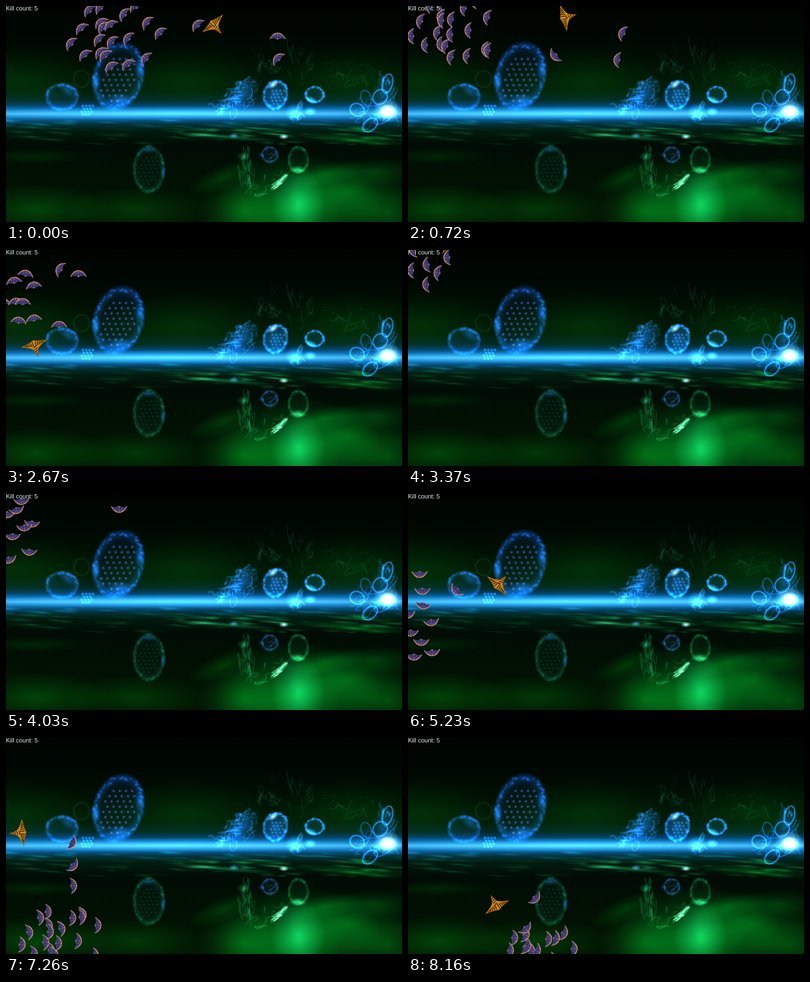
Animation of 707x385 px, one loop 8190 ms. Source, as an HTML page with a canvas:

```html
<!DOCTYPE html>
<html lang="en">
<head>
<meta charset="utf-8">
<title>Flock</title>
<style>
html, body { margin: 0; width: 100%; height: 100%; overflow: hidden; background: #000; }
canvas { display: block; }
</style>
</head>
<body>
<canvas id="stage" width="707" height="385"></canvas>
<script>
const W = 707, H = 385, LOOP = 8190, TAU = Math.PI * 2;
const ctx = document.getElementById('stage').getContext('2d');
const scene = document.createElement('canvas');
scene.width = W;
scene.height = H;
const g = scene.getContext('2d');

let seed = 7;
const rnd = () => (seed = (seed * 16807) % 2147483647) / 2147483647;
const spread = r => (rnd() * 2 - 1) * r;

// ---------- scenery ----------
const BLUE = '#1e78ff', DEEP = '#1450c8', SKY = '#46b4ff', ICE = '#beF0ff',
  GREEN = '#006e18', MOSS = '#003c08', TEAL = '#0a4638', MINT = '#1e9a5a';

function local(x, y, rot, alpha, draw) {
  g.save();
  g.translate(x, y);
  g.rotate(rot);
  g.globalAlpha = Math.min(1, alpha);
  draw();
  g.restore();
}

function glow(x, y, rx, ry, c, a, rot = 0) {
  local(x, y, rot, a, () => {
    g.scale(rx, ry);
    const f = g.createRadialGradient(0, 0, 0, 0, 0, 1);
    f.addColorStop(0, c);
    f.addColorStop(0.5, c + '73');
    f.addColorStop(1, c + '00');
    g.fillStyle = f;
    g.fillRect(-1, -1, 2, 2);
  });
}

function softStroke(c, a, w) {
  g.strokeStyle = c;
  for (const k of [3, 1]) {
    g.globalAlpha = a / k;
    g.lineWidth = w * k;
    g.stroke();
  }
}

function ring(x, y, rx, ry, c, a, rot = 0) {
  local(x, y, rot, 1, () => {
    g.beginPath();
    g.ellipse(0, 0, rx, ry, 0, 0, TAU);
    softStroke(c, a, 1.4);
  });
}

// hollow cell with a mottled rim
function cell(x, y, rx, ry, c, a, rot = 0) {
  local(x, y, rot, a, () => {
    g.save();
    g.scale(rx, ry);
    const f = g.createRadialGradient(0, 0, 0, 0, 0, 1.08);
    f.addColorStop(0, c + '14');
    f.addColorStop(0.65, c + '24');
    f.addColorStop(0.88, c + '8c');
    f.addColorStop(1, c + '00');
    g.fillStyle = f;
    g.fillRect(-1.1, -1.1, 2.2, 2.2);
    g.restore();
    const n = rx + ry;
    for (let i = 0; i < n; i++) {
      const p = i / n * TAU, k = 0.93 + spread(0.08), s = 1.5 + rnd() * 3;
      glow(Math.cos(p) * rx * k, Math.sin(p) * ry * k, s, s, c, a * rnd());
    }
  });
}

function dots(x, y, rx, ry, gap, c, a) {
  for (let v = -ry, row = 0; v <= ry; v += gap * 0.85, row++)
    for (let u = -rx + (row % 2) * gap / 2; u <= rx; u += gap)
      if ((u / rx) ** 2 + (v / ry) ** 2 < 1) glow(x + u - v * 0.2, y + v, 3.2, 3.2, c, a);
}

function wisps(x, y, rx, ry, n, c, a, rot = 0) {
  local(x, y, rot, 1, () => {
    for (let i = 0; i < n; i++) {
      const u = spread(rx * 0.8), v = spread(ry * 0.8);
      g.beginPath();
      g.moveTo(u, v);
      g.bezierCurveTo(u + spread(rx / 2), v + spread(ry), u + spread(rx / 2), v + spread(ry),
        u + spread(rx / 1.5), v + spread(ry / 2));
      softStroke(c, a * (0.3 + rnd() * 0.7), 0.6 + rnd());
    }
  });
}

function streaks(x, y, w, h, n, c) {
  for (let i = 0; i < n; i++)
    glow(x + spread(w), y + spread(h), 10 + rnd() * 32, 1.5 + rnd() * 2.5, c, rnd() / 2, 0.06);
}

function sky() {
  const f = g.createLinearGradient(0, 0, 0, H);
  const stop = (y, c) => f.addColorStop(y / H, c);
  stop(0, '#000400');
  stop(60, '#000802');
  stop(115, '#011203');
  stop(150, '#021c07');
  stop(168, '#032a25');
  stop(177, '#054066');
  stop(184, '#0b72b8');
  stop(192, '#48b8f2');
  stop(198, '#1a86cc');
  stop(204, '#07507f');
  stop(211, '#033136');
  stop(222, '#021c10');
  stop(246, '#010c04');
  stop(H, '#021502');
  g.fillStyle = f;
  g.fillRect(0, 0, W, H);
}

function upperHalf() {
  for (const x of [20, 320, 620]) glow(x, 132, 150, 58, MOSS, 0.4);
  glow(300, 191, 350, 13, '#286e82', 0.6);

  cell(201, 125, 44, 60, DEEP, 0.75, 0.27);
  dots(200, 128, 31, 43, 11, '#645ad2', 0.75);
  glow(160, 134, 9, 17, BLUE, 0.7);
  glow(204, 168, 24, 13, BLUE, 0.55);
  glow(238, 112, 9, 20, DEEP, 0.7);
  ring(135, 130, 14, 15, TEAL, 0.25);
  cell(100, 162, 29, 24, DEEP, 0.75);
  glow(110, 150, 20, 11, DEEP, 0.5, 0.6);
  dots(145, 184, 12, 11, 6, BLUE, 0.9);

  glow(417, 160, 44, 21, DEEP, 0.8, -0.7);
  wisps(413, 162, 44, 22, 32, BLUE, 0.4, -0.7);
  wisps(390, 186, 22, 14, 12, SKY, 0.3);
  wisps(465, 100, 25, 28, 16, TEAL, 0.3);
  wisps(525, 92, 28, 40, 14, TEAL, 0.25);
  wisps(610, 122, 42, 26, 14, TEAL, 0.25);

  cell(481, 158, 22, 26, BLUE, 0.95, 0.25);
  glow(481, 158, 22, 25, DEEP, 0.6);
  dots(484, 162, 14, 17, 7, SKY, 0.4);
  glow(477, 140, 11, 6, ICE, 1, -0.6);
  cell(551, 158, 17, 15, BLUE, 0.9);
  glow(545, 167, 13, 6, SKY, 0.7, 0.4);
  glow(543, 188, 12, 8, SKY, 0.8);
  glow(516, 190, 18, 17, SKY, 0.6);
  wisps(517, 186, 18, 18, 12, SKY, 0.3);

  // growth on the right
  glow(681, 187, 26, 21, ICE, 0.9);
  glow(682, 188, 17, 13, '#ffffff', 1);
  glow(675, 155, 23, 34, DEEP, 0.5, 0.3);
  ring(681, 138, 9, 17, BLUE, 0.65, 0.25);
  ring(668, 162, 12, 14, BLUE, 0.6, 0.7);
  ring(627, 185, 13, 11, BLUE, 0.65, 0.4);
  ring(643, 164, 9, 14, DEEP, 0.5, -0.3);
  ring(650, 212, 15, 10, BLUE, 0.65, -0.7);
  wisps(655, 184, 42, 30, 20, BLUE, 0.4);
  wisps(680, 140, 16, 24, 10, BLUE, 0.35);
}

function lowerHalf() {
  streaks(170, 230, 150, 16, 28, '#0a4a24');
  streaks(420, 227, 120, 11, 30, MINT);
  streaks(590, 230, 130, 17, 36, '#0f8038');
  streaks(350, 209, 360, 5, 45, '#0a5a73');
  glow(390, 233, 100, 5, MINT, 0.5, 0.08);
  glow(620, 238, 110, 9, GREEN, 0.5, 0.08);
  glow(50, 268, 100, 14, MOSS, 0.4);
  glow(407, 231, 10, 5, SKY, 0.7);
  glow(496, 233, 9, 5, ICE, 1);

  cell(255, 291, 28, 42, '#105c4e', 0.6);
  dots(255, 293, 20, 30, 8, TEAL, 0.4);
  glow(254, 256, 14, 6, DEEP, 0.5);
  glow(281, 297, 5, 12, DEEP, 0.6);
  cell(471, 265, 15, 14, '#185096', 0.65);
  wisps(471, 265, 14, 13, 10, '#286ebe', 0.3);
  cell(522, 274, 18, 24, '#0c733e', 0.6);
  glow(521, 292, 16, 8, '#3cdc8c', 0.7);
  wisps(427, 285, 14, 46, 20, '#0f6e41', 0.35);
  glow(425, 268, 13, 8, MINT, 0.6);

  // green floor
  glow(522, 362, 150, 98, '#008726', 0.75);
  glow(522, 352, 48, 66, '#128c5f', 0.7);
  glow(425, 365, 85, 58, GREEN, 0.55);
  glow(615, 332, 115, 50, GREEN, 0.55);
  glow(660, 295, 80, 24, GREEN, 0.35);
  glow(570, 300, 75, 22, GREEN, 0.4, -0.2);
  glow(390, 305, 70, 22, MOSS, 0.7, -0.4);
  glow(680, 370, 80, 45, GREEN, 0.5);
  glow(55, 362, 130, 45, MOSS, 0.8);
  glow(230, 362, 130, 40, MOSS, 0.6);
  wisps(470, 315, 42, 14, 12, MINT, 0.25, -0.5);
  glow(488, 314, 24, 6, '#6ef0b4', 0.9, -0.75);
  wisps(488, 314, 22, 6, 8, '#a0ffd7', 0.5, -0.7);
}

// ---------- motion: rows are time, x, y, heading (0 = up, clockwise) ----------
const ship = [
  [0, 369, 31, -40], [500, 305, 2, -80], [1470, 184, 127, -180], [2100, 112, 228, -100],
  [2670, 50, 164, -15], [3500, 92, -45, 45], [4030, 225, -45, 110], [4450, 258, 35, 175],
  [5230, 157, 165, 225], [6300, 0, 258, 285], [6800, -42, 195, 385], [7260, 37, 171, 450],
  [8160, 160, 302, 511]];

const flock = [
  [0, 0, 0, -45], [600, -95, -15, -75], [1470, -202, 41, -120], [2050, -214, 88, -85],
  [2670, -198, 35, 0], [3300, -212, -55, -90], [4030, -208, 23, -185], [5230, -208, 199, -180],
  [6500, -170, 325, -235], [7260, -85, 307, -275], [8160, 45, 345, -255]];

// rows without a heading follow the flock's
const chaser = [
  [0, 341, 33, -45], [1470, 184, 136, -180], [2670, 94, 132, 0], [4030, 22, -30, -180],
  [5230, 21, 144, -180], [7260, 123, 231, -230], [8160, 211, 341, -220]];

const rover = [
  [0, 485, 54, 0], [1470, 274, 42, -115], [2670, 94, 33, -60], [3050, 85, -25, 0],
  [3650, 235, -20, 130], [4030, 202, 27, 180], [5230, 85, 173, 225], [6400, 10, 205, 330],
  [7260, 124, 189, 480], [8160, 228, 287, 495]];

const late = [
  [0, 485, 93], [1470, 263, 92], [2670, 128, 42], [4030, 28, 13],
  [5230, 26, 174], [7260, 123, 266], [8160, 214, 372]];

const edge = [
  [0, 274, 47], [1470, 30, 104], [2670, 30, 92], [4030, 33, 60],
  [5230, 24, 265], [7260, 139, 320], [8160, 265, 358]];

const formation = [
  [148, 7], [168, 2], [134, 39], [115, 66], [169, 29], [172, 38], [186, 33], [210, 14], [231, 0],
  [251, 29], [140, 86], [165, 59], [168, 82], [176, 87], [188, 63], [187, 107], [217, 57],
  [217, 103], [249, 93]];

// smooth curve through timed rows
function along(rows, t) {
  let i = 1;
  while (i < rows.length - 1 && rows[i][0] < t) i++;
  const a = rows[i - 1], b = rows[i], p = rows[i - 2] || a, n = rows[i + 1] || b;
  const h = b[0] - a[0], u = Math.min(1, (t - a[0]) / h), u2 = u * u, u3 = u2 * u;
  return a.map((v, j) => {
    const m = h * (b[j] - p[j]) / (b[0] - p[0]), k = h * (n[j] - v) / (n[0] - a[0]);
    return v * (2 * u3 - 3 * u2 + 1) + m * (u3 - 2 * u2 + u) + b[j] * (3 * u2 - 2 * u3) + k * (u3 - u2);
  }).slice(1);
}

// ---------- sprites ----------
const batShape = new Path2D('M-14 5Q-9-6 0-6Q9-6 14 5Q8 2 4 4L0 6L-4 4Q-8 2-14 5Z');
const batEdge = new Path2D('M-14 5Q-9-6 0-6Q9-6 14 5');
const batRibs = new Path2D('M-2-5L-8 2M2-5L8 2M-1-5L-3 4M1-5L3 4');
const shipShape = new Path2D('M-24 0Q-12-2-5-4L0-6L5-4Q12-2 24 0Q9 5 4 11L0 24L-4 11Q-9 5-24 0Z');
const shipStripes = new Path2D();
for (let x = 3; x < 20; x += 4) {
  for (const side of [-1, 1]) {
    shipStripes.moveTo(side * x, x / 6 - 4);
    shipStripes.lineTo(side * x * 0.7, 6 - x / 5);
  }
  shipStripes.moveTo(-3, x + 4);
  shipStripes.lineTo(3, x + 2);
}

const batFill = ctx.createLinearGradient(0, -6, 0, 6);
['#d7957f', '#70588c', '#333a78', '#a8707c'].forEach((c, i) => batFill.addColorStop(i / 3, c));

function sprite([x, y, deg], paint) {
  ctx.save();
  ctx.translate(x, y);
  ctx.rotate(deg * Math.PI / 180);
  paint();
  ctx.restore();
}

function line(path, color, w) {
  ctx.strokeStyle = color;
  ctx.lineWidth = w;
  ctx.stroke(path);
}

function bat() {
  ctx.fillStyle = batFill;
  ctx.fill(batShape);
  line(batRibs, '#1c1c48', 1);
  line(batEdge, '#e39a72', 1);
}

function manta() {
  ctx.fillStyle = '#c9861a';
  ctx.fill(shipShape);
  ctx.save();
  ctx.clip(shipShape);
  line(shipStripes, '#3a1c04', 1.4);
  ctx.restore();
  line(shipShape, '#8a4e0c', 0.7);
}

function draw(t) {
  ctx.drawImage(scene, 0, 0);
  ctx.fillStyle = '#dceef0';
  ctx.font = '11px "Liberation Sans", Arial, sans-serif';
  ctx.fillText('Kill count: 5', 0, 8);

  const [fx, fy, turn] = along(flock, t), drift = Math.min(1, t / 1470);
  formation.forEach(([x, y], i) => {
    const bx = x + fx + drift * 4 * Math.sin(t / 500 + i * 2);
    const by = 29 + (y - 29) * (1 - 0.15 * drift) + fy + drift * 3 * Math.cos(t / 600 + i * 4);
    sprite([bx, by, turn + 11 * Math.sin(i * 3.4 + t / 450)], bat);
  });
  for (const rows of [chaser, rover, late, edge]) {
    const [x, y, deg = turn] = along(rows, t);
    sprite([x, y, deg], bat);
  }
  sprite(along(ship, t), manta);
}

sky();
g.globalCompositeOperation = 'lighter';
upperHalf();
lowerHalf();

const STEP = 62.5;
function tick(now) {
  const t = now % LOOP;
  draw(Math.max(0, Math.floor((t + 32) / STEP) * STEP - 32));
  requestAnimationFrame(tick);
}
draw(0);
requestAnimationFrame(tick);
</script>
</body>
</html>
```
